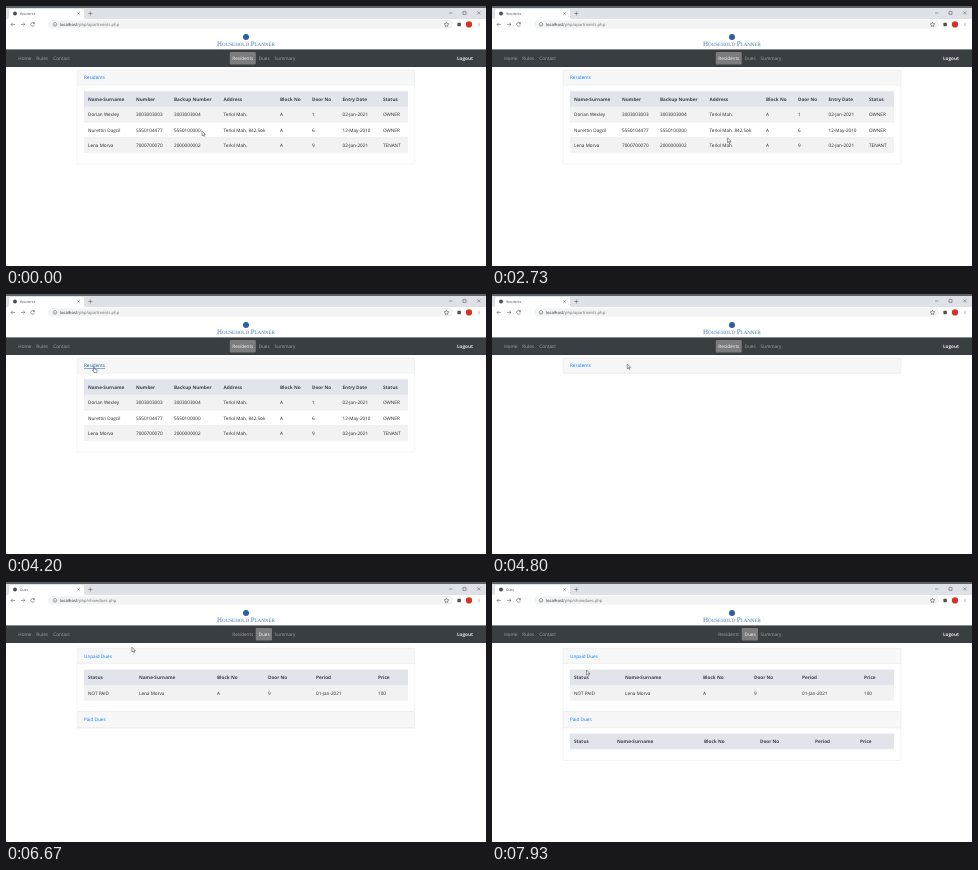
Animation of 480x260 px, one loop 8 s. Source, as an HTML page:

```html
<!DOCTYPE html>
<html lang="en">
<head>
<meta charset="utf-8">
<title>Residents</title>
<style>
html, body { margin: 0; height: 100%; overflow: hidden; background: #fff; }
svg { display: block; width: 100%; height: 100%; }
text { font: 4.65px "Open Sans", "Noto Sans", sans-serif; fill: #212529; text-rendering: geometricPrecision; white-space: pre; }
.bold { font-weight: 700; fill: #3b4148; }
.link { fill: #007bff; }
.link.over { fill: #0056b3; text-decoration: underline; }
.nav { fill: #a3a6a9; }
.nav.over { fill: #d0d2d4; }
.nav.active { fill: #fff; }
.out { font-weight: 700; fill: #e4e5e6; }
.tab { font-size: 3.4px; fill: #3c4043; }
.url { font-size: 4.15px; fill: #6a6e73; }
.host { fill: #202124; }
.brand { font: 6.9px "Liberation Serif", serif; font-variant: small-caps; fill: #3f74b0; }
.icon { fill: none; stroke: #5f6368; stroke-width: .6; }
.line { fill: none; stroke: #e1e2e4; stroke-width: .4; }
</style>
</head>
<body>
<svg id="stage" viewBox="0 0 480 260"></svg>
<script>
const LOOP = 8000, PITCH = 15.4;
const LEAVE = 5800;               // the second page replaces the first
const FOLD = [4420, 4770], UNFOLD = [7420, 7540];

// cursor tip: time, x, y
const PATH = [
  [0, 196, 125], [40, 196, 125], [300, 198, 158], [530, 200, 177],
  [670, 200, 177], [930, 203, 185.5], [1540, 203, 185.5], [1600, 206.5, 186], [1670, 210, 185],
  [1810, 210, 185], [2200, 225, 161], [2610, 225, 161], [3000, 259, 67], [3330, 258, 51],
  [3540, 258, 51], [4060, 92, 72], [4200, 88, 73], [4420, 88, 73], [4800, 135, 70],
  [5270, 255, 53], [5400, 257, 53], [6340, 257, 53], [6670, 126, 65],
  [7200, 88, 137], [7740, 88, 137], [7930, 94.5, 88], [8000, 94.5, 88]
];

const text = (x, mid, s, cls = '', id = '') =>
  `<text x="${x}" y="${mid + 1.7}" class="${cls}" id="${id}">${s}</text>`;
const rect = (x, y, w, h, fill, more = '') =>
  `<rect x="${x}" y="${y}" width="${w}" height="${h}" fill="${fill}" ${more}/>`;
const dot = (x, y, r, fill) => `<circle cx="${x}" cy="${y}" r="${r}" fill="${fill}"/>`;
const icon = d => `<path class="icon" d="${d}"/>`;
const frame = (y, h, id = '') =>
  `<rect id="${id}" class="line" x="71" y="${y}" width="337.8" height="${h}" rx="1"/>`;

function table(top, cols, rows) {
  return rows.map((row, i) => {
    const y = top + i * PITCH, fill = i ? (i % 2 ? '#f2f2f2' : '#fff') : '#e2e4eb';
    return rect(78, y, 324, PITCH, fill) +
      `<path class="line" d="M78 ${y}h324"/>` +
      row.map((s, c) => text(cols[c], y + PITCH / 2, s, i ? '' : 'bold')).join('');
  }).join('');
}

function header(y, h, title, id) {
  return rect(71, y, 337.8, h, '#f7f7f7') +
    `<path class="line" d="M71 ${y + h}h337.8"/>` + text(78, y + h / 2, title, 'link', id);
}

const fold = (id, y, h, body) =>
  `<clipPath id="${id}Clip"><rect id="${id}" x="70" y="${y}" width="340" height="${h}"/></clipPath>` +
  `<g clip-path="url(#${id}Clip)">${body}</g>`;

const browser =
  rect(0, 0, 480, 13, '#dee1e6') + rect(0, 0, 480, 2, '#5d6168') +
  '<path fill="#fff" d="M1 13q2 0 2-2V5q0-2 2-2H76q2 0 2 2v6q0 2 2 2z"/>' +
  dot(9, 7.5, 1.9, '#4a4e53') + text(14, 7.5, 'Residents', 'tab', 'tab') +
  icon('M71.4 6.3l2.4 2.4m0-2.4l-2.4 2.4M82.4 7.5h4m-2-2v4') +
  icon('M443 7h3.4M457 5.4h3v3h-3zM471.3 5.4l3 3m0-3l-3 3') +
  icon('M9 18.4H5m1.8-1.8L5 18.4l1.8 1.8M15 18.4h4m-1.8-1.8l1.8 1.8-1.8 1.8') +
  icon('M28.3 17.3a1.9 1.9 0 1 0 .2 1.6M28.6 16v1.6h-1.6') +
  rect(42, 14.2, 405, 8.4, '#f1f3f4', 'rx="4.2"') +
  icon('M49 16.6a1.8 1.8 0 1 0 .01 0M49 18.2v1.2') +
  `<text x="54" y="20" class="url"><tspan class="host">localhost</tspan><tspan id="url"></tspan></text>` +
  icon('M440.5 16.2l.7 1.5 1.6.2-1.2 1.1.3 1.6-1.4-.8-1.4.8.3-1.6-1.2-1.1 1.6-.2z') +
  rect(451.4, 16.8, 3.4, 3.4, '#4a4e53', 'rx=".6"') + dot(463, 18.4, 3.1, '#d93025') +
  [17, 18.4, 19.8].map(y => dot(473, y, .45, '#4a4e53')).join('');

const site =
  dot(240, 31, 3, '#2b5f9e') +
  '<text x="240" y="39.6" class="brand" text-anchor="middle">Household Planner</text>' +
  rect(0, 43.4, 480, 17.6, '#393e43') +
  rect(0, 46, 0, 12.4, '#7a7c7f', 'id="pill" rx="1"') +
  [[12.3, 'Home'], [30.3, 'Rules'], [47.3, 'Contact'], [268.5, 'Summary']]
    .map(([x, s]) => text(x, 52.3, s, 'nav')).join('') +
  text(226.3, 52.3, 'Residents', 'nav', 'navResidents') +
  text(252.6, 52.3, 'Dues', 'nav', 'navDues') + text(451, 52.3, 'Logout', 'out');

const residents = header(63.9, 15.3, 'Residents', 'residents') +
  fold('list', 79.3, 78.7, table(85.3, [82, 130, 168, 217.6, 274, 306, 336.5, 377], [
    ['Name-Surname', 'Number', 'Backup Number', 'Address', 'Block No', 'Door No', 'Entry Date', 'Status'],
    ['Dorian Wexley', '3003003003', '3003003004', 'Terkıl Mah.', 'A', '1', '02-Jan-2021', 'OWNER'],
    ['Nurettin Dagcil', '5550104477', '5550100000', 'Terkıl Mah. 842.Sok', 'A', '6', '12-May-2010', 'OWNER'],
    ['Lena Morva', '7000700070', '2000000002', 'Terkıl Mah.', 'A', '9', '02-Jan-2021', 'TENANT']
  ])) + frame(63.9, 94.1, 'listFrame');

const dues = header(66.1, 15.4, 'Unpaid Dues', 'unpaid') +
  table(87.8, [82, 133, 211, 262, 310, 372], [
    ['Status', 'Name-Surname', 'Block No', 'Door No', 'Period', 'Price'],
    ['NOT PAID', 'Lena Morva', 'A', '9', '01-Jan-2021', '100']
  ]) + frame(66.1, 63.4) + header(129.5, 16.4, 'Paid Dues', 'paid') +
  fold('paidList', 145.9, 0, table(151.8, [82, 125, 212, 268, 323, 368], [
    ['Status', 'Name-Surname', 'Block No', 'Door No', 'Period', 'Price']
  ])) + frame(129.5, 16.4, 'paidFrame');

const cursor = '<g id="cursor" fill="#fff" stroke="#222" stroke-width=".45" stroke-linejoin="round">' +
  '<path id="arrow" d="M0 0V4.8L1.1 3.8 1.9 5.5 2.7 5.1 2 3.5H3.4Z"/>' +
  '<path id="hand" d="M0 0q.6 0 .6.6V2.2l2 .5q.5.2.4.8L2.6 5.6H0L-1.3 3.4q-.2-.6.4-.5l.4.5V.6Q-.5 0 0 0Z"/></g>';

const $ = id => document.getElementById(id);
$('stage').innerHTML = browser + site +
  `<g id="pageResidents">${residents}</g><g id="pageDues">${dues}</g>` + cursor;

// clickable areas: id, x, y, width, height, page (-1: both)
const LINKS = [
  ['residents', 77, 68, 23, 8, 0], ['unpaid', 77, 70, 30, 8, 1], ['paid', 77, 134, 24, 8, 1],
  ['navResidents', 224, 46, 26, 12.4, -1], ['navDues', 250, 46, 16, 12.4, -1]
];

const show = (id, on) => $(id).style.display = on ? '' : 'none';
const size = (id, h) => $(id).setAttribute('height', h);

function progress(t, [a, b]) {
  const p = Math.min(1, Math.max(0, (t - a) / (b - a)));
  return p * p * (3 - 2 * p);
}

function pointer(t) {
  const i = PATH.findIndex(k => k[0] > t);
  const [t0, x0, y0] = PATH[i - 1], [t1, x1, y1] = PATH[i];
  const p = (t - t0) / (t1 - t0);
  return [x0 + (x1 - x0) * p, y0 + (y1 - y0) * p];
}

function draw(now) {
  const t = now % LOOP, page = t < LEAVE ? 0 : 1;
  const [x, y] = pointer(t);

  show('pageResidents', !page);
  show('pageDues', page);
  $('tab').textContent = page ? 'Dues' : 'Residents';
  $('url').textContent = page ? '/php/showdues.php' : '/php/apartments.php';
  $('pill').setAttribute('x', page ? 249.7 : 223.8);
  $('pill').setAttribute('width', page ? 16.3 : 26);
  $('navResidents').classList.toggle('active', !page);
  $('navDues').classList.toggle('active', !!page);

  const list = 78.7 * (1 - progress(t, FOLD)), paid = 32.6 * progress(t, UNFOLD);
  size('list', list);
  size('listFrame', 15.4 + list);
  size('paidList', paid);
  size('paidFrame', 16.4 + paid);

  let hand = false;
  for (const [id, lx, ly, w, h, on] of LINKS) {
    const over = (on < 0 || on === page) && x > lx && x < lx + w && y > ly && y < ly + h;
    $(id).classList.toggle('over', over);
    hand ||= over;
  }
  show('hand', hand);
  show('arrow', !hand);
  $('cursor').setAttribute('transform', `translate(${x} ${y})`);
}

const start = performance.now();
(function tick() {
  draw(performance.now() - start);
  requestAnimationFrame(tick);
})();
</script>
</body>
</html>
```
